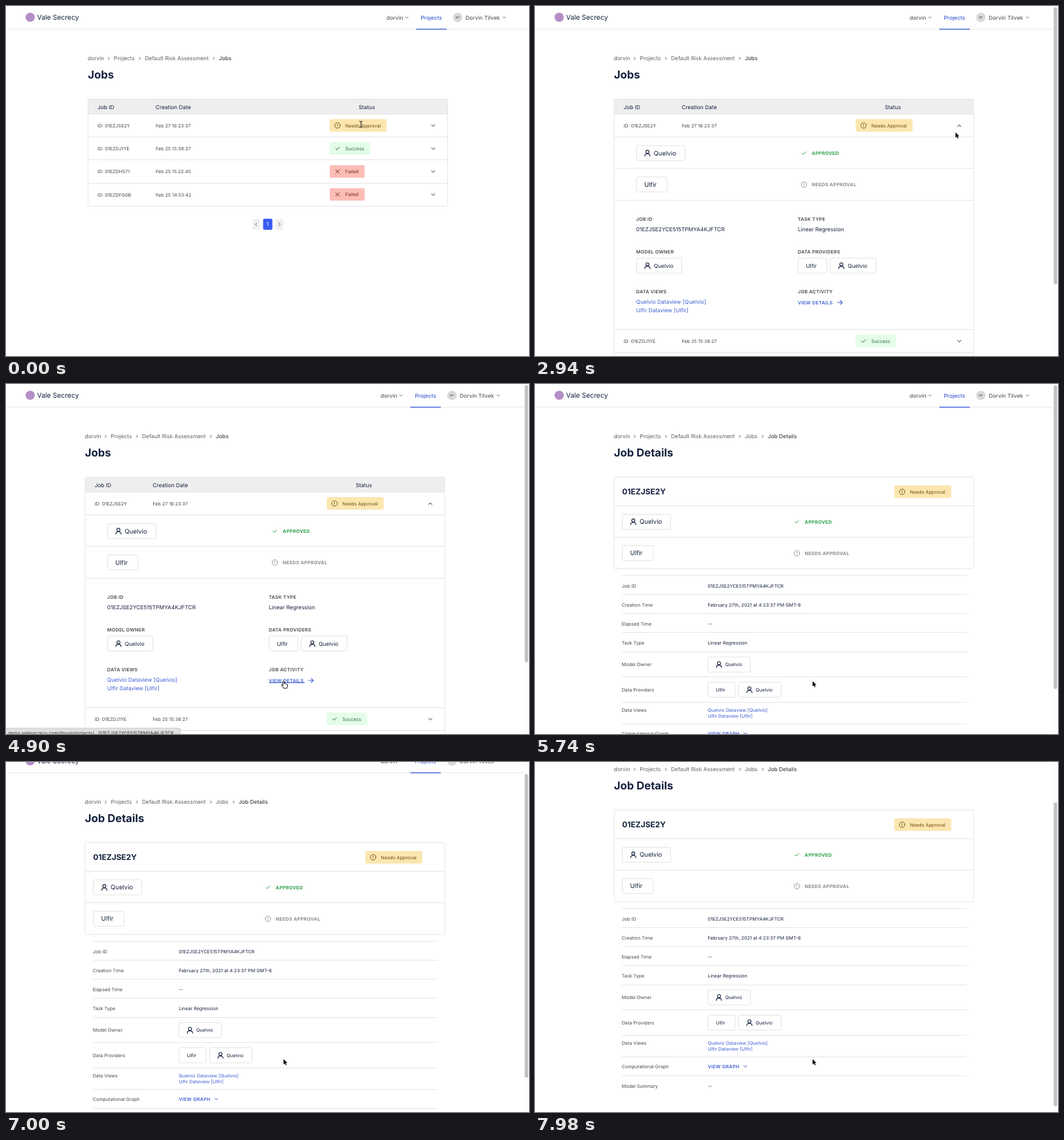
Animation, 800 px wide and 536 px high, one loop 8 s. Source, as an HTML page with a canvas:

```html
<!DOCTYPE html>
<html lang="en">
<head>
<meta charset="utf-8">
<title>Jobs</title>
<style>
  html, body { margin: 0; width: 100%; height: 100%; overflow: hidden; background: #fff; }
  canvas { display: block; width: 800px; height: 536px; }
</style>
</head>
<body>
<canvas id="stage" width="800" height="536"></canvas>
<script>
const W = 800, H = 536, LOOP = 8000, STEP = 70;
const OPEN_AT = 1750, DETAILS_AT = 5110;
const S = 7.16, M = 8.36, L = 9.55;
const INK = '#14203d', GREY = '#5b5e66', DARK = '#44474d', BLUE = '#3f5fd3', LINE = '#e6e6e6';
const BRAND = 'Vale Secrecy', USER = 'dorvin', FULL = 'Dorvin Tilvek', INITIALS = 'DT';
const ORG = 'Quelvio', PEER = 'Ulfir';
const JOB = '01EZJSE2Y', JOB_LONG = JOB + 'CE515TPMYA4KJFTCR';

const c = document.getElementById('stage').getContext('2d');
c.textRendering = 'geometricPrecision';

// y is the middle of the capital letters
function text(str, x, y, size = M, color = INK, weight = 400, spacing = 0) {
  c.font = `${weight} ${size}px Inter, sans-serif`;
  c.letterSpacing = spacing + 'px';
  c.fillStyle = color;
  c.fillText(str, x, y + size * 0.364);
}

function caps(str, x, y, color = DARK, weight = 600) {
  text(str, x, y, S, color, weight, 0.27);
}

function box(x, y, w, h, fill, stroke, r = 2) {
  c.beginPath();
  c.roundRect(x, y, w, h, r);
  if (fill) { c.fillStyle = fill; c.fill(); }
  if (stroke) { c.strokeStyle = stroke; c.lineWidth = 1; c.stroke(); }
}

function rule(x1, x2, y, color = LINE) {
  c.fillStyle = color;
  c.fillRect(x1, Math.round(y - 0.5), x2 - x1, 1);
}

function path(color, width, ...pts) {
  c.strokeStyle = color;
  c.lineWidth = width;
  c.lineCap = c.lineJoin = 'round';
  c.beginPath();
  for (let i = 0; i < pts.length; i += 2) c.lineTo(pts[i], pts[i + 1]);
  c.stroke();
}

function chevron(x, y, dir, r = 2.5, color = '#333', width = 1) {
  const d = r * 0.55;
  if (dir === 'down') path(color, width, x - r, y - d, x, y + d, x + r, y - d);
  if (dir === 'up') path(color, width, x - r, y + d, x, y - d, x + r, y + d);
  if (dir === 'right') path(color, width, x - d, y - r, x + d, y, x - d, y + r);
  if (dir === 'left') path(color, width, x + d, y - r, x - d, y, x + d, y + r);
}

function check(x, y, color) {
  path(color, 1, x - 2.8, y, x - 1, y + 2, x + 3, y - 2.1);
}

function alertIcon(x, y, color) {
  c.strokeStyle = color;
  c.lineWidth = 0.9;
  c.beginPath();
  c.arc(x, y, 4.2, 0, 7);
  c.stroke();
  path(color, 0.9, x, y - 2, x, y + 0.3);
  path(color, 0.9, x, y + 2, x, y + 2.1);
}

function person(x, y) {
  c.strokeStyle = INK;
  c.lineWidth = 1.1;
  c.lineCap = 'round';
  c.beginPath();
  c.arc(x, y - 2, 2.4, 0, 7);
  c.moveTo(x - 4, y + 4.6);
  c.bezierCurveTo(x - 4, y - 0.2, x + 4, y - 0.2, x + 4, y + 4.6);
  c.stroke();
}

function tag(x, y, w, name, size, textX, iconX) {
  box(x + 0.5, y - 11.5, w - 1, 23, '#fff', '#e3e3e3');
  if (iconX) person(iconX, y);
  text(name, textX, y, size);
}

const BADGES = {
  'Needs Approval': [87, '#fce6b0', '#6f4d12'],
  Success: [62, '#e3fde8', '#2f6a3d'],
  Failed: [53.5, '#fcbdb7', '#7a2620']
};

function badge(kind, x, y) {
  const [w, bg, ink] = BADGES[kind], ix = x + 12;
  box(x, y - 9.7, w, 19.2, bg);
  if (kind === 'Success') check(ix, y, ink);
  else if (kind === 'Failed') {
    path(ink, 1, ix - 2.8, y - 2.8, ix + 2.8, y + 2.8);
    path(ink, 1, ix - 2.8, y + 2.8, ix + 2.8, y - 2.8);
  } else alertIcon(ix, y, ink);
  text(kind, x + 24, y, S, ink);
}

function approvals(x, y, top) {
  check(x, top, '#2fa14c');
  caps('APPROVED', x + 12, top, '#2fa14c', 700);
  alertIcon(x, y, '#8c8c8c');
  caps('NEEDS APPROVAL', x + 12, y, '#8c8c8c', 700);
}

// dx is the room left by the absent scrollbar
function nav(dx) {
  c.fillStyle = '#b48ec6';
  c.beginPath();
  c.arc(37, 17.3, 7, 0, 7);
  c.fill();
  text(BRAND, 47.5, 17.3, 10.4);
  rule(0, dx ? W : 792, 35.5, '#e8e8e8');
  text(USER, 573 + dx, 17.5, M, GREY, 500);
  chevron(604 + dx, 17.7, 'down', 1.8, GREY, 0.9);
  text('Projects', 625.5 + dx, 17.5, M, BLUE, 500);
  c.fillStyle = BLUE;
  c.fillRect(618.5 + dx, 34.8, 46.5, 1.4);
  c.fillStyle = '#d9d9d9';
  c.beginPath();
  c.arc(682 + dx, 17.5, 7.2, 0, 7);
  c.fill();
  text(INITIALS, 679.2 + dx, 17.5, 4.2, '#444', 600);
  text(FULL, 694 + dx, 17.5, M, GREY, 500);
  chevron(753 + dx, 17.7, 'down', 1.8, GREY, 0.9);
}

function heading(dx, title, crumbs) {
  crumbs.forEach(([str, x], i) => {
    const last = i === crumbs.length - 1;
    text(str, x + dx, 80.3, M, last ? '#3f434b' : GREY, last ? 500 : 400);
    if (!last) chevron(crumbs[i + 1][1] + dx - 7.6, 80.3, 'right', 1.8, GREY, 0.9);
  });
  text(title, 120.7 + dx, 105, 16.7, INK, 700);
}

const CRUMBS = [[USER, 120.6], ['Projects', 160.3], ['Default Risk Assessment', 208], ['Jobs', 321]];

function scrollbar(y, h) {
  c.fillStyle = '#fcfcfc';
  c.fillRect(792, 0, 8, H);
  box(793.5, y, 5.2, h, '#c1c1c1', null, 2.6);
}

function row(dx, y, id, date, kind, open, hover) {
  text('ID: ' + id, 135.6 + dx, y + 0.3, S, DARK);
  text(date, 224.4 + dx, y + 0.3, S, DARK);
  badge(kind, 490.6 + dx, y);
  if (hover) box(642 + dx, y - 6.5, 14, 14, '#e8e8e8');
  chevron(649 + dx, y + 0.3, open ? 'up' : 'down');
}

function tableHead(dx, bottom) {
  c.fillStyle = '#eeeeee';
  c.fillRect(121 + dx, 143, 550, 23);
  box(121 + dx, 142.5, 550, bottom - 142.5, null, LINE);
  rule(121 + dx, 671 + dx, 165.5);
  text('Job ID', 135.6 + dx, 154.8);
  text('Creation Date', 224.3 + dx, 154.8);
  text('Status', 535 + dx, 154.8);
}

function jobList(hover) {
  const dx = 4.5;
  nav(9);
  heading(dx, 'Jobs', CRUMBS);
  tableHead(dx, 306.5);
  [[JOB, '27 16:23:37', 'Needs Approval'], ['01EZDJ1YE', '25 15:38:27', 'Success'],
   ['01EZDH571', '25 15:22:45', 'Failed'], ['01EZDFG0B', '25 14:53:42', 'Failed']]
    .forEach(([id, date, kind], i) => {
      const y = 183 + i * 35.2;
      row(dx, y, id, 'Feb ' + date, kind, false, hover && i === 0);
      if (i < 3) rule(121 + dx, 671 + dx, y + 17.7);
    });
  box(377.5, 326, 11, 16.5, '#f0f0f0');
  chevron(382.5, 334.3, 'left', 2, '#555', 0.9);
  box(393.3, 325.8, 14.2, 17, '#3a5cf4');
  text('1', 398.3, 334.4, M, '#fff');
  box(412.8, 326, 11.4, 16.5, '#f0f0f0');
  chevron(418.4, 334.3, 'right', 2, '#555', 0.9);
}

function openJob(hover, linkHover) {
  nav(0);
  heading(0, 'Jobs', CRUMBS);
  tableHead(0, 600);
  row(0, 183, JOB, 'Feb 27 16:23:37', 'Needs Approval', true, hover);
  for (const y of [200.5, 248.8, 297.3, 495.5, 530.5]) rule(121, 671, y);

  tag(155, 225.3, 75, ORG, L, 181.5, 172);
  tag(155, 273.3, 47.5, PEER, L, 167.2);
  approvals(411.3, 273.4, 225.3);

  caps('JOB ID', 154.8, 326.2);
  text(JOB_LONG, 154.8, 341.8);
  caps('TASK TYPE', 402, 326.2);
  text('Linear Regression', 402, 341.8);
  caps('MODEL OWNER', 154.8, 376.4);
  tag(155, 397.6, 70, ORG, M, 181.7, 172);
  caps('DATA PROVIDERS', 402, 376.4);
  tag(402, 397.6, 45, PEER, M, 414.4);
  tag(451.3, 397.6, 71, ORG, M, 478.2, 468.6);
  caps('DATA VIEWS', 154.8, 437.4);
  text(`${ORG} Dataview [${ORG}]`, 154.8, 453.4, M, BLUE);
  text(`${PEER} Dataview [${PEER}]`, 154.8, 465.8, M, BLUE);
  caps('JOB ACTIVITY', 402, 437.4);
  caps('VIEW DETAILS', 402, 454, BLUE);
  path(BLUE, 1.1, 463, 454, 470, 454);
  path(BLUE, 1.1, 467, 451, 470, 454, 467, 457);
  if (linkHover) rule(402, 457, 457.6, BLUE);

  row(0, 513, '01EZDJ1YE', 'Feb 25 15:38:27', 'Success');
  scrollbar(2, 424);
  if (linkHover) {
    box(-2, 527, 269, 20, '#dfe0e1', '#cfcfcf', 3);
    text(`demo.valesecrecy.com/${USER}/projects/.../${JOB_LONG}`, 3, 534, 7, '#333');
  }
}

function jobDetails(scroll) {
  c.save();
  c.translate(0, -Math.round(scroll));
  nav(0);
  heading(0, 'Job Details', [...CRUMBS, ['Job Details', 356]]);
  box(121, 142.5, 550, 140.5, null, LINE);
  rule(121, 671, 186.5);
  rule(121, 671, 234.5);
  text(JOB, 133.3, 165, 11.94, INK, 700);
  badge('Needs Approval', 549.6, 165);
  tag(133, 211, 75, ORG, L, 160, 150.4);
  tag(133, 259, 48.5, PEER, L, 145.6);
  approvals(400.6, 259.2, 211);

  for (const y of [293, 322.5, 351.5, 380.5, 410, 448.5, 487.5, 520, 549.5]) rule(133, 660, y);
  [['Job ID', 309, JOB_LONG], ['Creation Time', 338, 'February 27th, 2021 at 4:23:37 PM GMT-6'],
   ['Elapsed Time', 367.2, '--'], ['Task Type', 396.5, 'Linear Regression'], ['Model Owner', 429.4],
   ['Data Providers', 468], ['Data Views', 499.5], ['Computational Graph', 535.2],
   ['Model Summary', 565, '--']].forEach(([label, y, value]) => {
    text(label, 132.7, y, S, DARK);
    if (value) text(value, 264.2, y, S);
  });
  tag(264, 429.6, 66, ORG, S, 291, 281.4);
  tag(264, 468.2, 42.5, PEER, S, 276.8);
  tag(311, 468.2, 66, ORG, S, 337.6, 328);
  text(`${ORG} Dataview [${ORG}]`, 264.2, 499.5, S, BLUE);
  text(`${PEER} Dataview [${PEER}]`, 264.2, 508.5, S, BLUE);
  caps('VIEW GRAPH', 264.2, 535.2, BLUE);
  chevron(321.6, 535.2, 'down', 2.4, BLUE);
  c.restore();
  scrollbar(2 + scroll * 0.87, 465);
}

const smooth = u => u * u * (3 - 2 * u);
const linear = u => u;

// keys: [time, ...values]
function track(keys, t, ease) {
  if (t <= keys[0][0]) return keys[0].slice(1);
  for (let i = 1; i < keys.length; i++) {
    const a = keys[i - 1], b = keys[i];
    if (t < b[0]) {
      const u = ease((t - a[0]) / (b[0] - a[0]));
      return a.slice(1).map((v, k) => v + (b[k + 1] - v) * u);
    }
  }
  return keys[keys.length - 1].slice(1);
}

const POINTER = [[0, 543, 181], [770, 648.3, 186.5], [2870, 648.3, 186.5],
  [3640, 429.6, 486], [3780, 429.6, 486], [4340, 424.6, 455]];
const SCROLL = [[7000, 19], [7070, 39], [7140, 48], [7280, 57], [7560, 63], [7770, 63], [7980, 69]];

function scrollAt(t) {
  if (t < 7000) return 19 * Math.max(0, (t - 6300) / 700) ** 2;
  return track(SCROLL, t, linear)[0];
}

const ARROW = new Path2D('M0 0V8.3L2 6.6L3.3 9.6L4.6 9L3.3 6.1H5.8Z');
const HAND = new Path2D('M-1 6V.6Q-1-.4 0-.4T1 .6V4Q2.2 3.3 2.9 4.3Q4 3.8 4.6 4.8Q6 4.6 6 6V8' +
  'Q5.6 9.6 5 11H.2Q-.8 9-2.8 7Q-3.6 5.6-2.4 5.6Q-1.6 5.6-1 6.4Z');
const BEAM = new Path2D('M-2-4.5Q0-4.5 0-3.5Q0-4.5 2-4.5M0-3.5V4M-2 5Q0 5 0 4Q0 5 2 5');

function pointer(kind, x, y) {
  c.save();
  c.translate(x, y);
  c.lineJoin = 'round';
  if (kind === 'beam') {
    c.strokeStyle = '#111';
    c.lineWidth = 1;
    c.stroke(BEAM);
  } else {
    const arrow = kind === 'arrow';
    c.strokeStyle = arrow ? '#fff' : '#111';
    c.fillStyle = arrow ? '#000' : '#fff';
    c.lineWidth = arrow ? 1.4 : 1;
    if (arrow) { c.stroke(ARROW); c.fill(ARROW); }
    else { c.fill(HAND); c.stroke(HAND); }
  }
  c.restore();
}

const inside = (x, y, l, t, r, b) => x >= l && x <= r && y >= t && y <= b;

function draw(t) {
  const [x, y] = track(POINTER, t, smooth);
  let kind = 'arrow';
  c.fillStyle = '#fff';
  c.fillRect(0, 0, W, H);
  if (t < OPEN_AT) {
    const hover = inside(x, y, 646.5, 176, 660.5, 191);
    if (hover) kind = 'hand';
    else if (x < 574) kind = 'beam';
    jobList(hover);
  } else if (t < DETAILS_AT) {
    const hover = inside(x, y, 642, 176, 656, 191);
    const link = inside(x, y, 402, 448, 471, 460);
    if (hover || link) kind = 'hand';
    openJob(hover, link);
  } else {
    jobDetails(scrollAt(t));
  }
  pointer(kind, x, y);
}

const start = performance.now();
function tick() {
  const t = (performance.now() - start) % LOOP;
  draw(Math.floor(t / STEP) * STEP);
  requestAnimationFrame(tick);
}
tick();
</script>
</body>
</html>
```
